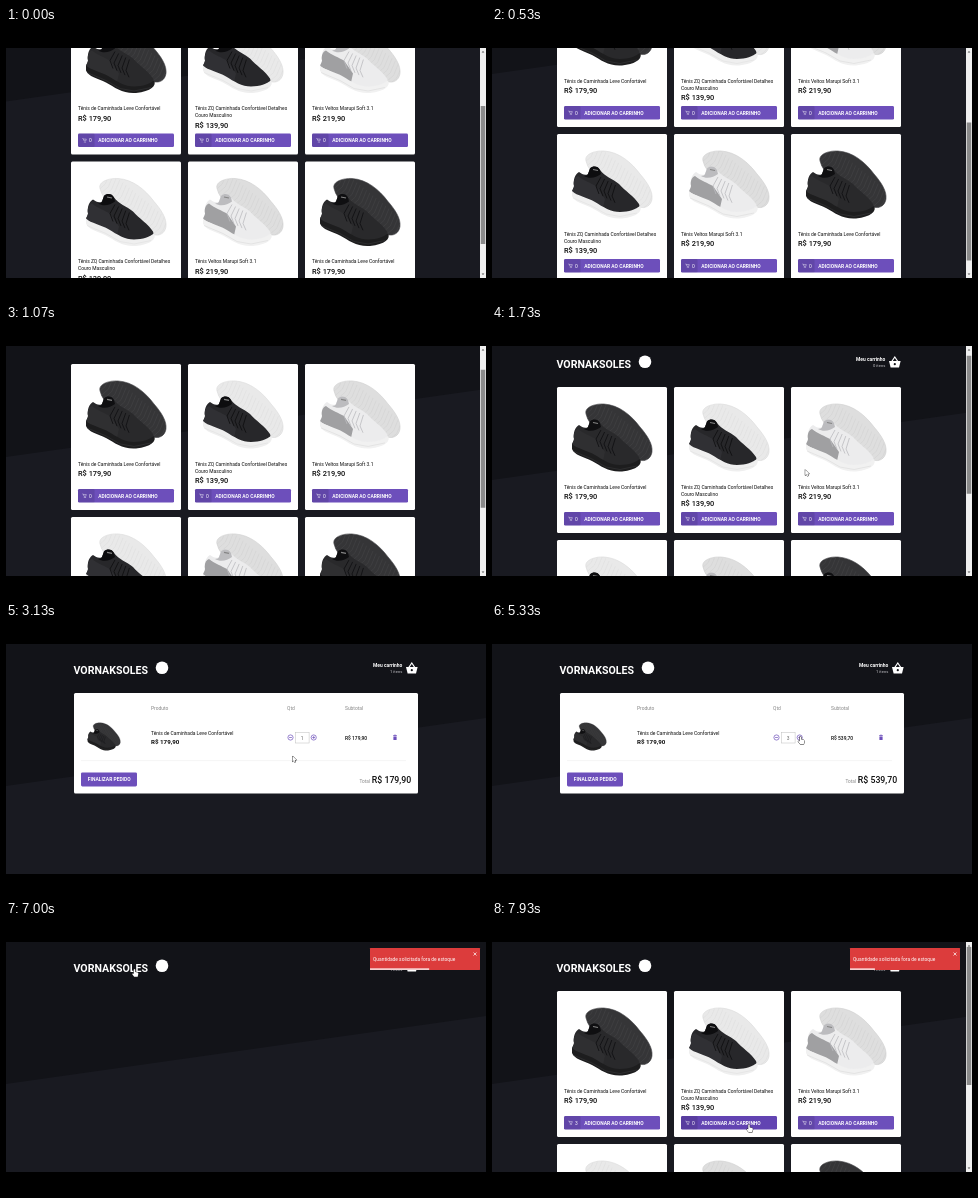
An HTML page with a canvas for the animation above (8000 ms loop, 480 px wide and 270 px high).

```html
<!DOCTYPE html>
<html lang="pt-BR">
<head>
<meta charset="utf-8">
<title>Loja de tênis</title>
<style>
html, body { margin: 0; width: 100%; height: 100%; overflow: hidden; background: #000; }
canvas { display: block; width: 100vw; height: 100vh; }
</style>
</head>
<body>
<canvas id="stage"></canvas>
<script>
const canvas = document.getElementById('stage');
const ctx = canvas.getContext('2d');
const LOOP = 8000, STEP = 1000 / 15;
const PURPLE = '#6d4fbb', PURPLE_HOVER = '#6244b2', GREY = '#858585', INK = '#0c0c0c';

const SHOES = {
  black: { sole: '#1d1d1e', upper: '#29292b', heel: '#2f2f31', out: '#353537', tread: '#464648', lace: '#0f0f11' },
  mixed: { sole: '#efefef', upper: '#27272a', heel: '#303034', out: '#e9e9e9', tread: '#dadada', lace: '#0d0d0f' },
  white: { sole: '#f1f1f1', upper: '#ececed', heel: '#a0a0a2', out: '#dedede', tread: '#cfcfcf', lace: '#bcbcbf' }
};
const LEVE = { name: ['Tênis de Caminhada Leve Confortável'], price: 'R$ 179,90', shoe: SHOES.black };
const COURO = { name: ['Tênis ZQ Caminhada Confortável Detalhes', 'Couro Masculino'], price: 'R$ 139,90', shoe: SHOES.mixed };
const SOFT = { name: ['Tênis Veltos Marupi Soft 3.1'], price: 'R$ 219,90', shoe: SHOES.white };
const GRID = [LEVE, COURO, SOFT, COURO, SOFT, LEVE];

const OUTSOLE = new Path2D('M29 27C27 20 38 16.5 47 17C62 18 74 28 83 40C90 48 96 57 95 65C94 72 88 75 82 73L56 58C46 48 32 40 29 27Z');
const UPPER = new Path2D('M17 52C16 46 18 40 22 38C25 40 28 42 31 40L33 34.5C36 31.5 41 32 43 36C47 42 56 45 62 50C68 57 77 62 82 70C84 76 80 81 63 81C52 81 44 74 34 68C26 64 17 63 15 58C15 56 17 54 17 52Z');
const HEEL = new Path2D('M17 52C16 47 18 43 21 42C27 47 34 49 39 52L48 65L46 74C36 68 26 63 15 58C15 56 17 54 17 52Z');
const COLLAR = new Path2D('M27 42C29 42 31 41 31 40L33 34.5C36 31.5 41 32 43 36L44 40C39 44 32 45 27 42Z');
const MIDSOLE = new Path2D('M15 57C20 62 30 63 38 68C46 73 54 78 63 78C72 78 79 75 83 72C86 77 80 83 65 84.5C52 85.5 44 79 35 74C27 70 17 68 15 62Z');
const ARROW = new Path2D('M0 0V5.6L1.3 4.4L2.2 6.4L3.1 6L2.2 4.1H4Z');
const HAND = new Path2D('M-.7 .4Q0 -.5 .7 .4V3L3.2 3.6Q3.9 3.9 3.8 4.8L3.2 7.8H-.3L-2.2 5.2Q-2.3 4.1 -1.3 4.5L-.7 5Z');

// Rows are [time, ...values].
const SCROLL = [[200, 88.5], [533, 116], [667, 119], [1067, 31], [1533, 8]];
const POINTER = [
  [1466, 478, 100], [1933, 207, 172], [2333, 130, 190], [2600, 130, 190],
  [2866, 396, 37], [2933, 396, 37], [3133, 286.5, 132], [3400, 306, 113],
  [3467, 306, 113], [3533, 305, 115], [4533, 305, 115], [4733, 229, 75],
  [4800, 229, 75], [4933, 109, 38], [5067, 305, 113], [5267, 305, 113],
  [5333, 308.5, 112.5], [6100, 308.5, 112.5], [6733, 136, 47], [6933, 128.5, 47],
  [7133, 128.5, 47], [7667, 254, 203], [7933, 257, 202.5]
];
const CART_IN = 2950, CART_OUT = 6900, CARDS_IN = 7120, TOAST_IN = 5613;

const clamp = v => Math.max(0, Math.min(1, v));
const smooth = p => p * p * (3 - 2 * p);

function track(keys, t, ease = p => p) {
  let i = 0;
  while (i < keys.length - 2 && t >= keys[i + 1][0]) i++;
  const [t0, ...a] = keys[i], [t1, ...b] = keys[i + 1];
  const p = ease(clamp((t - t0) / (t1 - t0)));
  return a.map((v, k) => v + (b[k] - v) * p);
}

function box(x, y, w, h, color, r = 0) {
  ctx.fillStyle = color;
  ctx.beginPath();
  ctx.roundRect(x, y, w, h, r);
  ctx.fill();
}

function line(points, color, width) {
  ctx.strokeStyle = color;
  ctx.lineWidth = width;
  ctx.beginPath();
  points.forEach(([x, y]) => ctx.lineTo(x, y));
  ctx.stroke();
}

function polygon(points, color) {
  ctx.fillStyle = color;
  ctx.beginPath();
  points.forEach(([x, y]) => ctx.lineTo(x, y));
  ctx.fill();
}

function disc(x, y, r, color) {
  ctx.fillStyle = color;
  ctx.beginPath();
  ctx.arc(x, y, r, 0, 7);
  ctx.fill();
}

// y is the middle of the capitals.
function text(str, x, y, { size = 4.93, weight = 400, color = INK, align = 'left' } = {}) {
  ctx.font = `${weight} ${size}px Roboto, sans-serif`;
  ctx.fillStyle = color;
  ctx.textAlign = align;
  ctx.fillText(str, x, y + size * 0.355);
}

function fillPath(path, color) {
  ctx.fillStyle = color;
  ctx.fill(path);
}

function drawShoe(x, y, scale, c) {
  ctx.save();
  ctx.translate(x, y);
  ctx.scale(scale, scale);
  fillPath(OUTSOLE, c.out);
  ctx.save();
  ctx.clip(OUTSOLE);
  for (let i = 0; i < 22; i++) {
    const px = 28 + i * 3.2, py = 14 + i * 2.6;
    line([[px + 8, py - 6], [px + 3, py + 6], [px - 6, py + 14]], c.tread, 0.5);
  }
  ctx.restore();
  ctx.strokeStyle = c.tread;
  ctx.lineWidth = 0.6;
  ctx.stroke(OUTSOLE);
  fillPath(UPPER, c.upper);
  fillPath(HEEL, c.heel);
  fillPath(COLLAR, c.lace);
  for (let i = 0; i < 5; i++) {
    line([[44 + i * 3.6, 43 + i * 2], [39 + i * 4, 52 + i * 2.5], [42 + i * 4, 60 + i * 2.2]], c.lace, 0.8);
  }
  line([[36, 35.5], [41, 36.5]], GREY, 1.2);
  fillPath(MIDSOLE, c.sole);
  line([[16, 64], [35, 72], [49, 80], [63, 82.5], [80, 79]], c.tread, 0.4);
  ctx.restore();
}

function drawBackdrop(scroll) {
  box(0, 20, 480, 230, '#191a21');
  polygon([[0, 0], [480, 0], [480, 94 - scroll], [0, 162 - scroll]], '#121318');
}

function drawHeader(dx, dy, items) {
  ctx.save();
  ctx.translate(dx, dy);
  text('VORNAKSOLES', 67.5, 46, { size: 10.6, weight: 700, color: '#fff' });
  disc(156, 43.7, 6.3, '#fff');
  text('Meu carrinho', 396.3, 41.2, { weight: 700, color: '#fff', align: 'right' });
  text(items + ' itens', 396.3, 47.2, { size: 4.13, color: '#c4c4c8', align: 'right' });
  line([[402.7, 43.6], [405.8, 39], [408.9, 43.6]], '#fff', 1.1);
  polygon([[400, 43], [411.6, 43], [410, 49.4], [401.6, 49.4]], '#fff');
  disc(405.8, 46.2, 1.1, '#111216');
  ctx.restore();
}

function drawCard(item, x, y, count, pointer) {
  box(x, y, 110, 146, '#fff', 1.5);
  drawShoe(x, y, 1, item.shoe);
  item.name.forEach((row, i) => text(row, x + 7, y + 100 + i * 7));
  text(item.price, x + 7, y + 109.8 + (item.name.length - 1) * 7, { size: 7.4, weight: 500 });
  const bx = x + 7, by = y + 125;
  const hover = inside(pointer, bx, by, 96, 14);
  box(bx, by, 96, 13.6, hover ? PURPLE_HOVER : PURPLE, 1.4);
  box(bx, by, 16.6, 13.6, 'rgba(0,0,0,.1)', 1.4);
  line([[bx + 4.4, by + 5], [bx + 5.2, by + 5], [bx + 6, by + 7.4], [bx + 7.8, by + 7.4], [bx + 8.3, by + 5.6], [bx + 5.4, by + 5.6]], '#fff', 0.4);
  disc(bx + 6.2, by + 8.6, 0.45, '#fff');
  disc(bx + 7.7, by + 8.6, 0.45, '#fff');
  text(count, bx + 11, by + 6.9, { color: '#fff' });
  text('ADICIONAR AO CARRINHO', bx + 20.2, by + 6.9, { weight: 700, color: '#fff' });
  return hover;
}

function drawScrollbar(scroll) {
  box(474, 20, 6, 230, '#efefef');
  box(474.7, 25 + scroll * 0.6, 4.6, 138, '#8a8a8a');
  [[23.8, -1], [246.2, 1]].forEach(([y, d]) =>
    polygon([[475.6, y - d * 0.7], [478.4, y - d * 0.7], [477, y + d * 0.8]], '#555'));
}

function drawHome(t, scroll, pointer) {
  const late = t > CART_OUT, loaded = !late || t >= CARDS_IN;
  const count = late ? 3 : t >= 2460 ? 1 : 0;
  drawHeader(loaded ? -3 : 0, -scroll, late ? 1 : count);
  if (!loaded) return inside(pointer, 67, 38, 98, 14);
  let hover = inside(pointer, 64, 38 - scroll, 98, 14) || inside(pointer, 363, 36 - scroll, 46, 15);
  GRID.forEach((item, i) => {
    const x = 65 + i % 3 * 117, y = 69 + Math.floor(i / 3) * 153 - scroll;
    if (drawCard(item, x, y, item === LEVE ? count : 0, pointer)) hover = true;
  });
  drawScrollbar(scroll);
  return hover;
}

function drawStepper(x, y, plus) {
  ctx.strokeStyle = PURPLE;
  ctx.lineWidth = 0.7;
  ctx.beginPath();
  ctx.arc(x, y, 2.6, 0, 7);
  ctx.stroke();
  line([[x - 1.4, y], [x + 1.4, y]], PURPLE, 0.7);
  if (plus) line([[x, y - 1.4], [x, y + 1.4]], PURPLE, 0.7);
}

function drawCart(t, pointer) {
  const qty = t < 3790 ? 1 : t < 4320 ? 2 : 3;
  const sum = 'R$ ' + (179.9 * qty).toFixed(2).replace('.', ',');
  drawHeader(0, 0, 1);
  box(68, 69, 344, 100.5, '#fff', 1.5);
  [['Produto', 145], ['Qtd', 281], ['Subtotal', 339]].forEach(([label, x]) => text(label, x, 83.8, { color: GREY }));
  drawShoe(75.4, 91.8, 0.41, SHOES.black);
  text(LEVE.name[0], 145, 109.4);
  text(LEVE.price, 145, 118, { size: 6.2, weight: 700 });
  drawStepper(284.5, 113.5, false);
  drawStepper(307.7, 113.5, true);
  ctx.strokeStyle = '#bdbdbd';
  ctx.lineWidth = 0.5;
  ctx.strokeRect(289.5, 108.6, 13.6, 10.4);
  text(qty, 296.2, 114, { color: '#666', align: 'center' });
  text(sum, 339, 113.8, { weight: 500 });
  box(387.1, 111.3, 3.8, 0.8, PURPLE);
  box(388.1, 110.7, 1.8, 0.8, PURPLE);
  box(387.4, 112.4, 3.2, 3.7, PURPLE, 0.4);
  line([[75, 136.6], [400, 136.6]], '#eaeaea', 0.5);
  box(75, 148.4, 56, 14, PURPLE, 1.4);
  text('FINALIZAR PEDIDO', 103.2, 155.5, { weight: 700, color: '#fff', align: 'center' });
  text(sum, 405.2, 155.8, { size: 8.75, weight: 500, align: 'right' });
  text('Total', 353.5, 157.2, { size: 4.7, color: GREY });
  return inside(pointer, 303.7, 109.5, 8, 8) || inside(pointer, 67, 38, 98, 14);
}

function drawToast(t) {
  const age = t - TOAST_IN;
  if (age < 0) return;
  const [shift] = age < 420
    ? track([[0, 1032], [420, -8.6]], age, p => 1 - (1 - p) ** 3)
    : track([[420, -8.6], [525, 3.4], [630, -1.7], [700, 0]], age, smooth);
  const x = (t >= CARDS_IN ? 358 : 364) + shift;
  box(x, 26, 110, 22, '#dc3c3c', 0.4);
  text('Quantidade solicitada fora de estoque', x + 3, 37.2, { size: 4.88, color: '#fff' });
  line([[x + 103.5, 30.5], [x + 106.5, 33.5]], '#fff', 0.7);
  line([[x + 106.5, 30.5], [x + 103.5, 33.5]], '#fff', 0.7);
  box(x, 46.3, 110 * clamp(1 - age / 3000), 1.7, 'rgba(255,255,255,.75)');
}

function inside([x, y], left, top, w, h) {
  return x >= left && x <= left + w && y >= top && y <= top + h;
}

function drawPointer([x, y], hand) {
  const shape = hand ? HAND : ARROW;
  ctx.save();
  ctx.translate(x, y);
  ctx.strokeStyle = '#222';
  ctx.lineWidth = 0.9;
  ctx.stroke(shape);
  fillPath(shape, '#fff');
  ctx.restore();
}

function draw(t) {
  const inCart = t >= CART_IN && t < CART_OUT;
  const scroll = t < CART_IN ? track(SCROLL, t)[0] : 0;
  const pointer = t < 1460 ? [500, 100] : track(POINTER, t, smooth);
  box(0, 0, 480, 270, '#000');
  ctx.save();
  ctx.beginPath();
  ctx.rect(0, 20, 480, 230);
  ctx.clip();
  drawBackdrop(scroll);
  const hand = inCart ? drawCart(t, pointer) : drawHome(t, scroll, pointer);
  drawToast(t);
  drawPointer(pointer, hand);
  ctx.restore();
}

function frame(now) {
  const w = Math.round(innerWidth * devicePixelRatio), h = Math.round(innerHeight * devicePixelRatio);
  if (canvas.width !== w || canvas.height !== h) {
    canvas.width = w;
    canvas.height = h;
  }
  ctx.setTransform(w / 480, 0, 0, h / 270, 0, 0);
  draw(Math.floor((now % LOOP + 4) / STEP) * STEP);
  requestAnimationFrame(frame);
}
requestAnimationFrame(frame);
</script>
</body>
</html>
```
